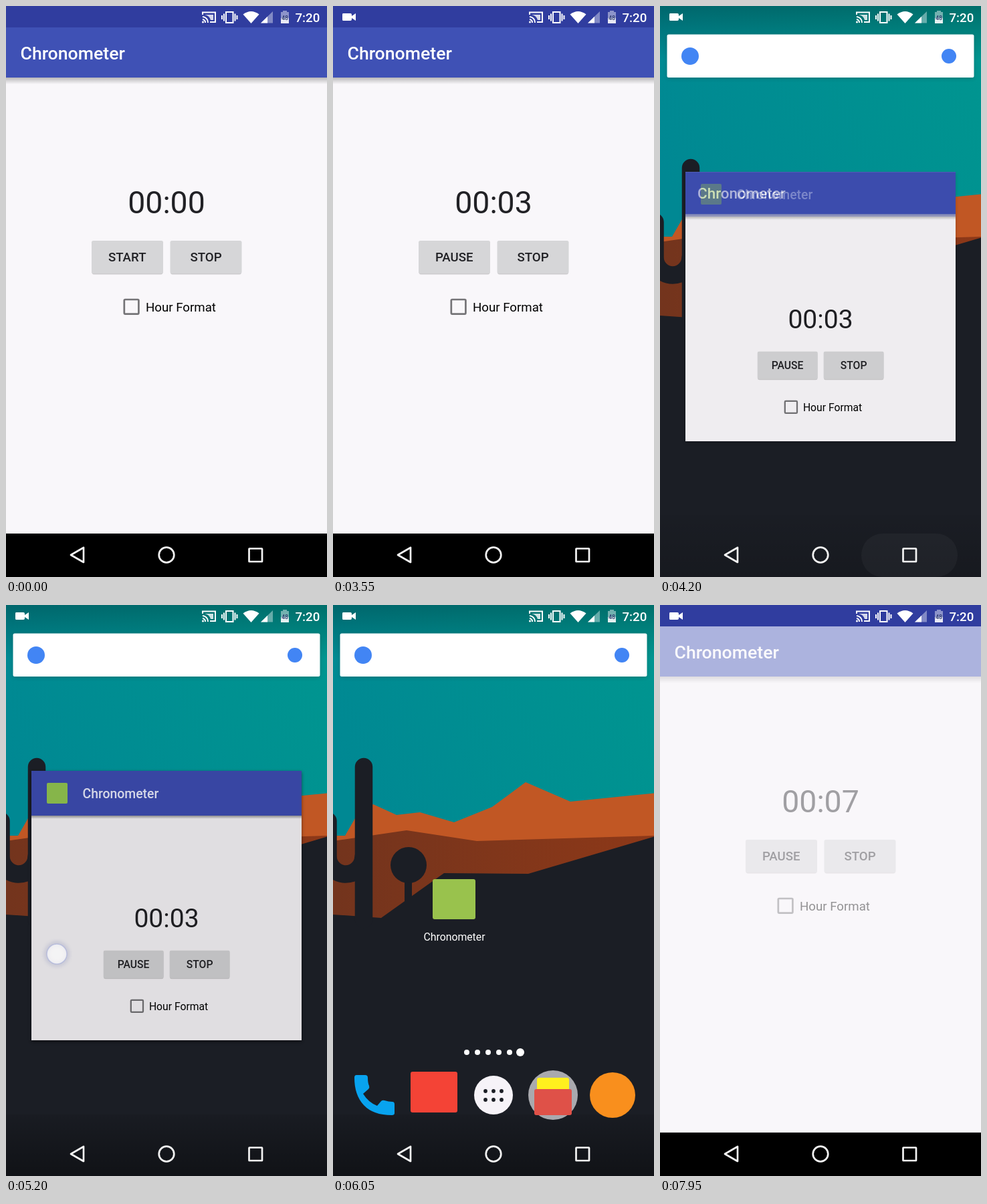
An HTML page for the animation above (8 s loop, 480 by 854 pixels).

```html
<!DOCTYPE html>
<html lang="en">
<head>
<meta charset="utf-8">
<title>Chronometer</title>
<style>
  html, body { margin: 0; width: 100%; height: 100%; overflow: hidden; background: #000; }
  svg { display: block; width: 100vw; height: 100vh; font-family: Roboto, sans-serif; }
  .medium { font-weight: 500; }
  .middle { text-anchor: middle; }
</style>
</head>
<body>
<svg viewBox="0 0 480 854">
  <defs>
    <linearGradient id="sky" x1="0" y1=".6" x2="1" y2=".2">
      <stop offset="0" stop-color="#008893"/><stop offset="1" stop-color="#009590"/>
    </linearGradient>
    <linearGradient id="ridge">
      <stop offset="0" stop-color="#73341d"/><stop offset="1" stop-color="#8d3818"/>
    </linearGradient>
    <linearGradient id="fadeDown" x2="0" y2="1">
      <stop offset="0" stop-opacity=".26"/><stop offset="1" stop-opacity="0"/>
    </linearGradient>
    <linearGradient id="fadeUp" x2="0" y2="1">
      <stop offset="0" stop-opacity=".08"/><stop offset="1" stop-opacity=".4"/>
    </linearGradient>
    <filter id="soft" x="-20%" y="-20%" width="140%" height="140%"><feGaussianBlur stdDeviation="3"/></filter>
    <clipPath id="appClip"><rect id="clip" width="480" height="854"/></clipPath>
    <g id="button">
      <rect x=".5" y="1.5" width="106" height="49" rx="3" opacity=".18"/>
      <rect width="107" height="49" rx="2.6" fill="#d6d6d8"/>
    </g>
  </defs>

  <g id="wallpaper">
    <rect width="480" height="854" fill="#1b1e25"/>
    <rect width="480" height="410" fill="url(#sky)"/>
    <path fill="#c15724" d="M0 345H18L33 319 60 298 95 314 130 310 181 325 238 302 288 265 355 294 480 281.500V360H0Z"/>
    <path fill="url(#ridge)" d="M0 353 110 337 215 353 480 345V470H0Z"/>
    <path fill="#1b1e25" d="M0 463 72 468 166 401 292 402 480 346.500V500H0Z"/>
    <g fill="none" stroke="#1b1e25" stroke-width="26.5" stroke-linecap="round">
      <path d="M46 242V470M-7.5 323V376A26.5 26.5 0 0 0 45.5 376"/>
      <path d="M112.5 389V445" stroke-width="11" stroke-linecap="butt"/>
    </g>
    <circle cx="113" cy="389" r="27" fill="#1b1e25"/>
    <rect width="480" height="80" fill="url(#fadeDown)"/>
    <rect id="navShade" y="762" width="480" height="92" fill="url(#fadeUp)"/>
    <rect x="11" y="45" width="458" height="63" rx="2" opacity=".2" filter="url(#soft)"/>
    <rect x="10.500" y="42.500" width="459" height="64.500" rx="2.5" fill="#fff"/>
    <circle cx="45" cy="75" r="13" fill="#4285f4"/>
    <circle cx="432" cy="75" r="11" fill="#4285f4"/>
    <text id="hint" x="389" y="82.5" font-size="19.5" fill="#acacac" text-anchor="end">Say "Ok Quorvi"</text>
  </g>

  <g id="icons">
    <rect x="149" y="410" width="64" height="60" rx="3" fill="#99c24d"/>
    <text class="middle" x="181.5" y="502" font-size="15.8" fill="#fff">Chronometer</text>
    <g id="pages" fill="#fff"></g>
    <path fill="#08a3ef" d="M35 703H48Q52 703 52 707 52 715 54 719 55 722 53 724L45 731Q53 744 66 749L72 742Q74 740 77 741 83 743 89 743 92 743 92 747V760Q92 763 88 763 60 763 46 748 32 733 32 707 32 703 35 703Z"/>
    <rect x="116" y="698" width="70" height="61" rx="3" fill="#f44336"/>
    <circle cx="240" cy="733" r="29" fill="#f6f3f8"/>
    <g id="drawer" fill="#1b1e25"></g>
    <circle cx="329" cy="733" r="37" fill="#a9a9ae"/>
    <rect x="305" y="707" width="48" height="20" rx="3" fill="#fff01e"/>
    <rect x="301" y="724" width="56" height="39" rx="3" fill="#df5148"/>
    <circle cx="418" cy="733" r="34" fill="#f98f1d"/>
  </g>

  <g id="app">
    <rect id="cardShadow" y="34" width="480" height="479" filter="url(#soft)"/>
    <g clip-path="url(#appClip)">
      <rect width="480" height="854" fill="#f9f7fa"/>
      <rect width="480" height="32" fill="#303d9f"/>
      <g id="content">
        <rect y="107" width="480" height="10" fill="url(#fadeDown)"/>
        <rect y="32" width="480" height="75" fill="#3f51b5"/>
        <text class="medium" x="21.5" y="79.5" font-size="26.67" fill="#fff">Chronometer</text>
        <text class="middle" id="clock" x="240" y="309.5" font-size="46.4" fill="#212125"></text>
        <use href="#button" x="128" y="351"/>
        <use href="#button" x="245.5" y="351"/>
        <rect id="press" x="128" y="351" width="107" height="49" rx="2.6"/>
        <g class="medium middle" font-size="18.67" fill="#212125">
          <text id="toggle" x="181.3" y="382.3"></text>
          <text x="299" y="382.3">STOP</text>
        </g>
        <rect x="176.8" y="439" width="21.6" height="21.6" rx="1.5" fill="none" stroke="#757477" stroke-width="2.7"/>
        <text x="209" y="457" font-size="18.67">Hour Format</text>
      </g>
    </g>
  </g>

  <g id="header">
    <rect x="38" y="315" width="404" height="336" opacity=".1"/>
    <rect x="38" y="315" width="404" height="5" fill="url(#fadeDown)"/>
    <rect x="38" y="248" width="404" height="67" fill="#3846a3"/>
    <rect x="61" y="266" width="31" height="31" rx="2" fill="#86b54a"/>
    <text x="114.5" y="288.7" class="medium" font-size="19.4" fill="#d6d8e8">Chronometer</text>
  </g>

  <rect id="navBlack" y="789" width="480" height="65"/>
  <rect id="navRipple" x="301" y="789" width="144" height="65" rx="32" fill="#fff"/>
  <g fill="none" stroke="#f4f4f4" stroke-width="2.7" stroke-linejoin="round">
    <path d="M97 821 116 810V832Z"/>
    <circle cx="240" cy="821" r="11.3"/>
    <rect x="363.5" y="811.5" width="19.5" height="19.5" rx=".5"/>
  </g>

  <g fill="#fff">
    <path id="camera" d="M15 11H26Q28 11 28 13V15L34 11V22L28 18V20Q28 22 26 22H15Q14 22 14 20V13Q14 11 15 11Z"/>
    <g fill="none" stroke="#fff" stroke-width="2">
      <path d="M294 13V9.5H313V24H305M294 16A8.5 8.5 0 0 1 302 25M294 20A4.5 4.5 0 0 1 298 25"/>
      <path d="M297 13Q304 14 306 21H310V13Z" stroke="none" fill="#fff" opacity=".8"/>
      <rect x="329" y="9" width="10.5" height="16"/>
      <path d="M323 14V20M326 11.5V22.5M342.5 11.5V22.5M345.5 14V20"/>
    </g>
    <circle cx="294.5" cy="24" r="1.5"/>
    <path d="M354.5 12.5Q366.5 3.5 378.5 12.5L366.5 26Z"/>
    <path d="M381 25.5H399V8Z" opacity=".4"/>
    <path d="M381 25.5H391V15.8Z"/>
    <path d="M411 9H414V7H420V9H423V26H411Z" opacity=".45"/>
    <path d="M411 18H423V26H411Z" opacity=".8"/>
    <text class="medium middle" x="417" y="20.5" font-size="9" fill="#303d70">48</text>
    <text class="medium" x="432.5" y="24" font-size="18.67">7:20</text>
  </g>

  <g id="touch">
    <circle r="16" fill="none" stroke="#5560a0" stroke-width="3" opacity=".4" filter="url(#soft)"/>
    <circle r="15" fill="#fff" fill-opacity=".65" stroke="#a3abd8" stroke-opacity=".6" stroke-width="1.5"/>
  </g>
</svg>
<script>
const LOOP = 8000;
const el = id => document.getElementById(id);
const set = (id, attrs) => Object.entries(attrs).forEach(([k, v]) => el(id).setAttribute(k, v));
const fade = (id, opacity) => set(id, { opacity });
const mix = (a, b, p) => a + (b - a) * p;
const ramp = (t, a, b) => Math.min(1, Math.max(0, (t - a) / (b - a)));
const ease = u => u * u * (3 - 2 * u);
const pulse = (t, a, b, c, d) => ramp(t, a, b) * (1 - ramp(t, c, d));
const dot = (x, y, r) => `<circle cx="${x}" cy="${y}" r="${r}"/>`;

el('pages').innerHTML = [0, 1, 2, 3, 4, 5].map(i => dot(200 + 16 * i, 669, i < 5 ? 4 : 6)).join('');
el('drawer').innerHTML = [0, 1, 2, 3, 4, 5].map(i => dot(228 + 12 * (i % 3), i < 3 ? 727 : 740, 2.9)).join('');

function drawTouch(t) {
  const slide = Math.pow(ramp(t, 5250, 5650), 1.7);
  const taps = [
    [182, 376, 350, 400, 500, 600],
    [373, 821, 3560, 3600, 3660, 3720],
    [76 + 352 * slide, 522, 5150, 5200, 5620, 5740],
    [183, 460, 7450, 7500, 7580, 7700]
  ];
  const [x, y, ...times] = taps.find(tap => t < tap[5]) || taps[0];
  set('touch', { transform: `translate(${x} ${y})`, opacity: pulse(t, ...times) });
}

function drawApp(t) {
  const launching = t >= 7700;
  const shrink = launching ? 0 : ease(ramp(t, 3720, 4103));
  const reveal = ease(ramp(t, 7700, 7850));
  const swipe = 394 * Math.pow(Math.max(0, (t - 5250) / 400), 1.7);
  const shift = launching ? 0 : swipe;
  const scale = mix(1, 404 / 480, shrink);
  const visible = t < 5800 || launching;
  const settled = launching ? 0 : ramp(t, 4100, 4350);

  set('app', {
    transform: `translate(${38 * shrink + shift} ${221.3 * shrink}) scale(${scale})`,
    display: visible ? 'inline' : 'none',
    opacity: launching ? ramp(t, 7700, 7760) : 1
  });
  if (launching) {
    set('clip', {
      x: mix(149, 0, reveal), y: mix(410, 0, reveal),
      width: mix(64, 480, reveal), height: mix(60, 854, reveal)
    });
  } else {
    const top = 31.7 * shrink;
    const bottom = mix(796, 510.4, shrink);
    set('clip', { x: 0, y: top, width: 480, height: bottom - top });
  }
  fade('cardShadow', settled * .5);
  fade('content', launching ? ramp(t, 7900, 8025) : 1);
  set('header', {
    transform: `translate(${shift} 0)`,
    opacity: visible ? settled : 0
  });
  fade('navBlack', launching ? reveal : +(t < 3720));

  const elapsed = Math.max(0, Math.floor((t - 480) / 1020));
  el('clock').textContent = '00:0' + (launching ? elapsed : Math.min(3, elapsed));
  el('toggle').textContent = t < 500 ? 'START' : 'PAUSE';
  fade('press', .13 * pulse(t, 380, 500, 650, 1150));
}

function draw(t) {
  drawApp(t);
  drawTouch(t);
  fade('camera', +(t >= 50));
  fade('icons', ramp(t, 5780, 6020));
  fade('hint', +(t >= 6400));
  fade('navShade', ramp(t, 4100, 4350));
  fade('navRipple', .09 * pulse(t, 3560, 3700, 3950, 4350));
}

const start = performance.now();
function tick() {
  draw((performance.now() - start) % LOOP);
  requestAnimationFrame(tick);
}
draw(0);
requestAnimationFrame(tick);
</script>
</body>
</html>
```
